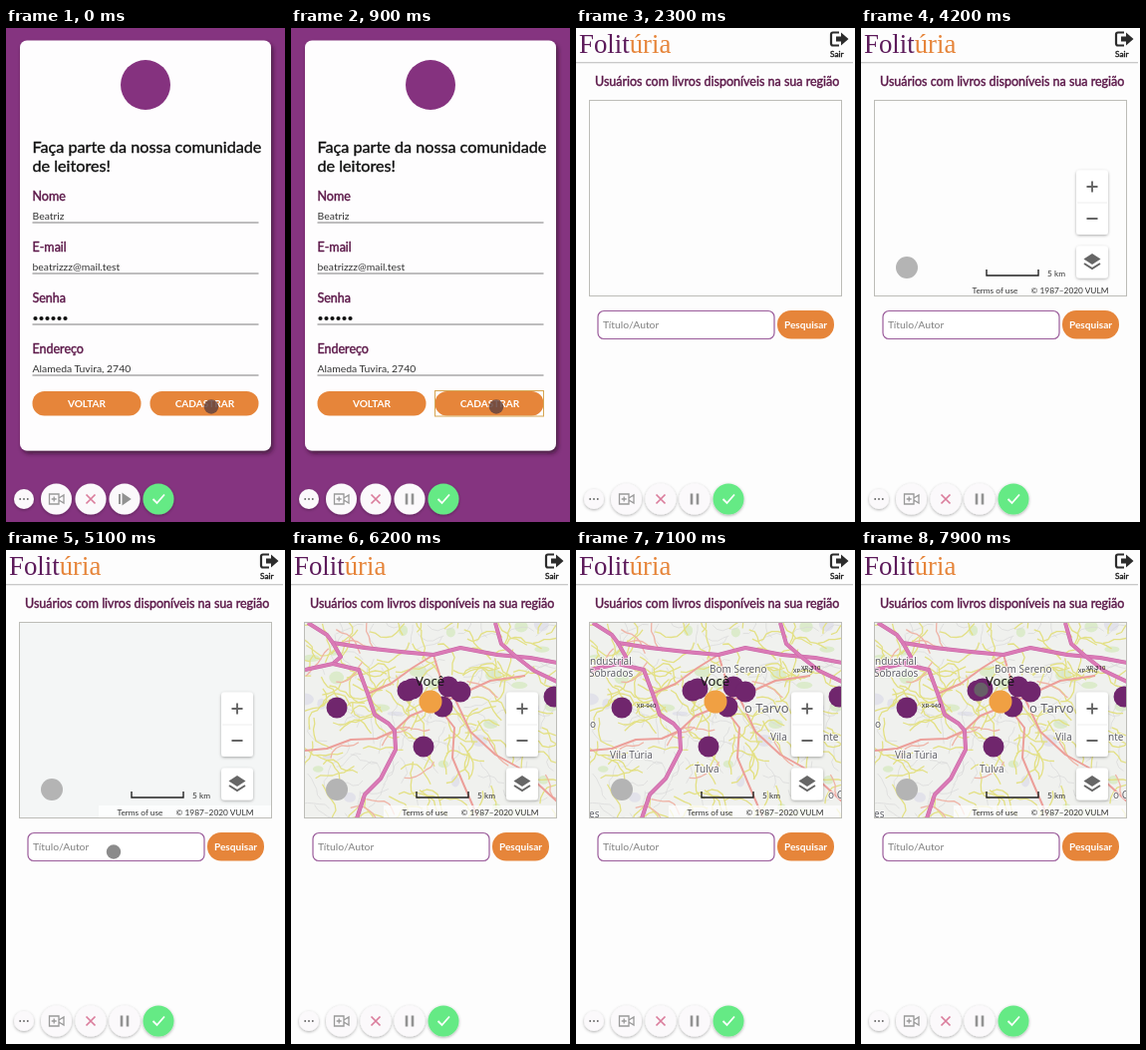
Recreate the animation shown at these times as an HTML page. Size 280x495 px, loop 8 s.

```html
<!DOCTYPE html>
<html lang="pt-BR">
<head>
<meta charset="utf-8">
<title>Comunidade de leitores</title>
<style>
html, body { margin: 0; width: 100%; height: 100%; overflow: hidden; background: #fdfdfd; }
svg { display: block; width: 100vw; height: 100vh; font-family: Lato, sans-serif; }
.heavy { stroke: currentColor; stroke-width: .4; fill: currentColor; }
.label { color: #5b1748; font-size: 12.5px; }
.value { fill: #333; font-size: 10.4px; }
.btn { fill: #fff; font-size: 10.1px; font-weight: 700; text-anchor: middle; }
.small { font-size: 8.3px; fill: #333; }
.place { font: 10px "Noto Sans", sans-serif; fill: #606068; stroke: #fff; stroke-width: 2px; stroke-opacity: .75; paint-order: stroke; }
.shield { font: 6px "Noto Sans", sans-serif; fill: #222; }
</style>
</head>
<body>
<svg viewBox="0 0 280 495" preserveAspectRatio="none">
  <defs>
    <filter id="cardShadow" x="-10%" y="-10%" width="120%" height="120%">
      <feDropShadow dx="2" dy="3" stdDeviation="2" flood-color="#2b0828" flood-opacity=".65"/>
    </filter>
    <filter id="soft" x="-30%" y="-30%" width="160%" height="160%">
      <feDropShadow dx="0" dy="1" stdDeviation="1.8" flood-color="#000" flood-opacity=".32"/>
    </filter>
    <clipPath id="mapClip"><rect x="14" y="73" width="252" height="195"/></clipPath>
  </defs>

  <g id="signup">
    <rect width="280" height="495" fill="#853480"/>
    <rect x="14" y="12.5" width="252" height="411" rx="7" fill="#fefdfe" filter="url(#cardShadow)"/>
    <circle cx="140" cy="57" r="25" fill="#85327f"/>
    <g class="heavy" color="#111" font-size="16.2">
      <text x="26.5" y="125">Faça parte da nossa comunidade</text>
      <text x="26.5" y="144">de leitores!</text>
    </g>
    <g id="fields"></g>
    <g fill="#e6853a">
      <rect x="26.5" y="364" width="109" height="24.5" rx="12"/>
      <rect x="144.5" y="364" width="109" height="24.5" rx="12"/>
    </g>
    <rect id="focus" x="144.5" y="363.5" width="109" height="25.5" fill="none" stroke="#d6a653"/>
    <text class="btn" x="81" y="380">VOLTAR</text>
    <text class="btn" x="199.5" y="380">CADASTRAR</text>
  </g>

  <g id="home">
    <rect width="280" height="495" fill="#fdfdfd"/>
    <text x="3" y="25" font-size="26.8" fill="#5c1a5a" style="font-family:'Liberation Serif',serif">Folit<tspan fill="#e6853a">úria</tspan></text>
    <path d="M264 4.5H258Q256 4.5 256 6.5V15.5Q256 17.5 258 17.5H264" fill="none" stroke="#2c2c2c" stroke-width="2.2"/>
    <path d="M261 8.5H266V4.5L273.5 11L266 17.5V13.5H261Z" fill="#2c2c2c"/>
    <text class="small heavy" color="#111" x="255" y="28.5">Sair</text>
    <path d="M0 34.5H278" stroke="#c9c9c9"/>
    <path d="M0 35.5H278" stroke="#ececec"/>
    <text class="heavy" color="#5b1748" x="19" y="57.5" font-size="12.5">Usuários com livros disponíveis na sua região</text>

    <g clip-path="url(#mapClip)">
      <rect id="tiles" x="13" y="72" width="254" height="197" fill="#f4f6f6"/>
      <g id="roads" fill="none" stroke-linejoin="round"></g>
      <g id="places"></g>
      <g id="pins"></g>
      <g id="controls">
        <rect id="credit" x="93" y="256" width="174" height="13" fill="#fff" opacity=".75"/>
        <circle cx="46" cy="240" r="11" fill="#b4b4b4"/>
        <path d="M126 242V248H178V242" fill="none" stroke="#222" stroke-width="1.4"/>
        <text class="small" x="187" y="248.5">5 km</text>
        <text class="small" x="111.5" y="265.5">Terms of use</text>
        <text class="small" x="170.5" y="265.5">© 1987–2020 VULM</text>
        <g filter="url(#soft)" fill="#fff">
          <rect x="216" y="142.5" width="32" height="64.5" rx="3.5"/>
          <rect x="216" y="218.5" width="32" height="32" rx="3.5"/>
        </g>
        <path d="M217 175H247" stroke="#eee"/>
        <path d="M226.5 159H237.500M232 153.500V164.500M226.500 191H237.500" stroke="#666" stroke-width="1.9"/>
        <path d="M232 226L240.500 231.500L232 237L223.500 231.500Z" fill="#666"/>
        <path d="M224 236L232 241L240 236" fill="none" stroke="#666" stroke-width="2"/>
      </g>
    </g>
    <rect x="13.5" y="72.5" width="253" height="196" fill="none" stroke="#bdbdb8"/>
    <rect x="22" y="283.5" width="177" height="28" rx="6" fill="#fff" stroke="#9b5c9b" stroke-width="1.2"/>
    <text x="27" y="301" font-size="10.4" fill="#808080">Título/Autor</text>
    <rect x="202" y="283" width="57" height="28.5" rx="14" fill="#e6853a"/>
    <text class="btn" x="230.5" y="301">Pesquisar</text>
  </g>

  <g id="toolbar">
    <g filter="url(#soft)" fill="#fbf9fb">
      <circle cx="18" cy="472" r="10"/>
      <circle cx="50.5" cy="472" r="15.5"/>
      <circle cx="85" cy="472" r="15.5"/>
      <circle cx="119" cy="472" r="15.5"/>
      <circle cx="153" cy="472" r="15.5" fill="#65ea85"/>
    </g>
    <path d="M14.2 472H21.9" stroke="#666" stroke-width="1.9" stroke-linecap="round" stroke-dasharray="0 3.8"/>
    <path d="M43.5 467H53V477H43.5ZM53 471L58 468V476L53 473M48.2 469.5V474.5M45.7 472H50.7" fill="none" stroke="#999" stroke-width="1.3"/>
    <path d="M80.5 467.5L89.5 476.5M89.5 467.5L80.5 476.5" stroke="#da7c9b" stroke-width="1.7"/>
    <path id="resume" d="M114 467V477M117.5 467.5L124 472L117.5 476.5Z" fill="#929292" stroke="#929292" stroke-width="2"/>
    <path id="pause" d="M116 466.5V477.5M122 466.5V477.5" stroke="#929292" stroke-width="2.6"/>
    <path d="M147.5 472L151.5 476L159 467.5" fill="none" stroke="#fff" stroke-width="1.8"/>
  </g>
  <circle id="touch" r="7.2"/>
</svg>
<script>
const LOOP = 8000;
const $ = id => document.getElementById(id);
const add = (parent, tag, attrs, text = '') => {
  const node = document.createElementNS('http://www.w3.org/2000/svg', tag);
  for (const key in attrs) node.setAttribute(key, attrs[key]);
  node.textContent = text;
  $(parent).append(node);
};

[['Nome', 'Beatriz'], ['E-mail', 'beatrizzz@mail.test'], ['Senha', ''], ['Endereço', 'Alameda Tuvira, 2740']]
  .forEach(([label, value], i) => {
    const y = 172.5 + i * 51;
    add('fields', 'text', { class: 'heavy label', x: 26.5, y }, label);
    add('fields', 'text', { class: 'value', x: 26.5, y: y + 19 }, value);
    add('fields', 'path', { d: `M26.5 ${y + 22.5}H253.5`, stroke: '#a8a8a8', 'stroke-width': 1.4 });
  });
for (let i = 0; i < 6; i++) add('fields', 'circle', { cx: 29.5 + i * 6, cy: 291, r: 2.1, fill: '#111' });

let seed = 41;
const random = () => (seed = (seed * 16807) % 2147483647) / 2147483647;

function street(steps, length, bend) {
  let x = 5 + random() * 270, y = 65 + random() * 210, angle = random() * 6.28;
  let d = `M${x.toFixed(1)} ${y.toFixed(1)}`;
  for (let i = 0; i < steps; i++) {
    angle += (random() - .5) * bend;
    x += Math.cos(angle) * length;
    y += Math.sin(angle) * length;
    d += `L${x.toFixed(1)} ${y.toFixed(1)}`;
  }
  return d;
}
const road = (d, stroke, width) => add('roads', 'path', { d, stroke, 'stroke-width': width });

function drawMap() {
  add('roads', 'rect', { x: 13, y: 72, width: 254, height: 197, fill: '#f0f1ee' });
  for (let i = 0; i < 30; i++) {
    add('roads', 'ellipse', {
      cx: 13 + random() * 254, cy: 72 + random() * 197, rx: 3 + random() * 7, ry: 2 + random() * 5,
      fill: i % 3 ? '#dcebcb' : '#e2e2ea'
    });
  }
  for (let i = 0; i < 90; i++) road(street(5, 6, 1.8), '#d9d9d9', .7);
  for (let i = 0; i < 130; i++) road(street(7, 6, 1.6), '#e3e084', 1.3);
  for (let i = 0; i < 14; i++) road(street(6, 6, 1.2), '#efb3a6', 1.3);
  [
    'M104 181L120 166L140 158L165 147L200 131L235 126', 'M104 181L86 189L60 190L36 199L14 201',
    'M150 160L164 178L162 208L172 232L188 269', 'M165 150L180 182L205 205L232 220L267 252',
    'M143 105L150 128L158 150', 'M77 144L100 134L122 118L143 105'
  ].forEach(d => road(d, '#ec9f9a', 2));
  [
    'M17 73L36 85L42 93L74 98L110 102L143 105L170 98L207 105L240 108L267 113',
    'M14 120L42 114L50 107L42 93',
    'M42 114L68 120L77 144L84 165L98 174L104 181L105 200L90 229L74 245L66 269',
    'M205 73L211 94L226 107L244 121L267 132'
  ].forEach(d => {
    road(d, '#c568a6', 4);
    road(d, '#db7ab6', 3);
  });
}
drawMap();

[['ndustrial', 14, 115], ['Sobrados', 13, 127], ['Bom Sereno', 134, 123], ['Vila', 195, 191], ['nte', 248, 191],
 ['Vila Túria', 34, 209], ['Tulva', 119, 223], ['o', 14, 178], ['es', 13, 268], ['o C', 253, 249]]
  .forEach(([name, x, y]) => add('places', 'text', { class: 'place', x, y }, name));
add('places', 'text', { class: 'place', x: 169, y: 163, style: 'font-size:13px' }, 'o Tarvo');
[['XR-940', 61, 158], ['XP-310', 218, 123], ['XP-310', 226, 120]]
  .forEach(([name, x, y]) => add('places', 'text', { class: 'shield', x, y }, name));

[[46, 158], [133, 197], [117, 141], [122, 139], [158, 137], [170, 142], [152, 157], [264, 147]]
  .forEach(([cx, cy]) => add('pins', 'circle', { cx, cy, r: 10.5, fill: '#70266d' }));
add('pins', 'circle', { cx: 140, cy: 152, r: 11.5, fill: '#f0a043' });
add('pins', 'text', { x: 125, y: 136, style: 'font:13px "Noto Sans",sans-serif', fill: '#171717' }, 'Você');

const spans = {
  signup: [0, 2000], focus: [500, 2000], home: [2000, LOOP],
  resume: [0, 300], pause: [300, LOOP],
  controls: [3200, LOOP], tiles: [4600, LOOP], credit: [4600, LOOP],
  pins: [6000, LOOP], roads: [6000, LOOP], places: [6900, LOOP]
};
const touches = [
  { from: 0, to: 1100, x: 206, y: 379.5, fill: '#65443f', opacity: .85 },
  { from: 5000, to: 5400, x: 108, y: 302.5, fill: '#858585', opacity: .95 },
  { from: 7700, to: LOOP, x: 120.5, y: 140, fill: '#666', opacity: .9 }
];

function render(t) {
  for (const id in spans) {
    const [from, to] = spans[id];
    $(id).style.display = t >= from && t < to ? '' : 'none';
  }
  const tap = touches.find(p => t >= p.from && t < p.to);
  const dot = $('touch');
  dot.style.display = tap ? '' : 'none';
  if (tap) {
    dot.setAttribute('cx', tap.x);
    dot.setAttribute('cy', tap.y);
    dot.setAttribute('fill', tap.fill);
    dot.setAttribute('opacity', tap.opacity);
  }
}

const start = performance.now();
function frame(now) {
  render(Math.max(0, now - start) % LOOP);
  requestAnimationFrame(frame);
}
render(0);
requestAnimationFrame(frame);
</script>
</body>
</html>
```
